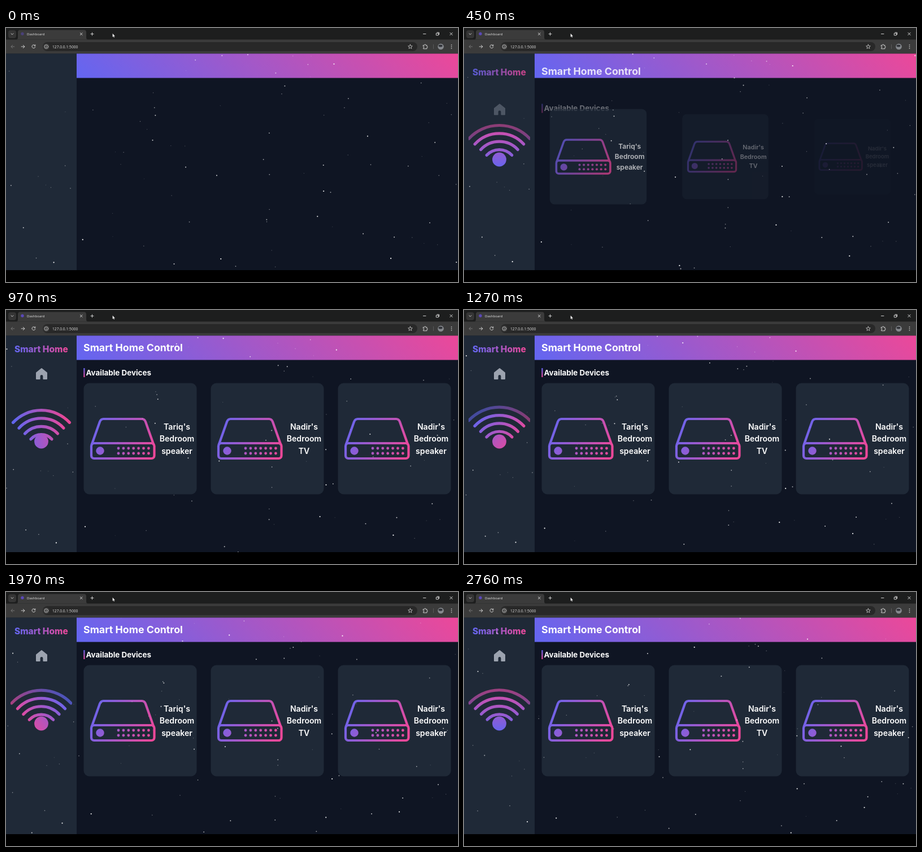
An HTML page for the animation above (2.79 s loop, 800 by 450 pixels).

```html
<!DOCTYPE html>
<html lang="en">
<head>
<meta charset="utf-8">
<title>Dashboard</title>
<style>
  html, body { margin: 0; width: 100%; height: 100%; overflow: hidden; background: #000; }
  svg { display: block; width: 100%; height: 100%; }
  text { font-family: Inter, sans-serif; font-weight: 700; fill: #fff; }
  .ui text { font-family: "Open Sans", sans-serif; font-weight: 400; fill: #e3e3e3; }
  .line { fill: none; stroke: #d0d0d0; stroke-linecap: round; stroke-linejoin: round; }
  .thin { stroke-width: .8; }
  .label { font-size: 14.1px; font-weight: 600; text-anchor: middle; }
  .device { fill: none; stroke: url(#device); stroke-width: 4.2; stroke-linejoin: round; }
  .dot { fill: url(#device); }
</style>
</head>
<body>
<svg viewBox="0 0 800 450">
  <defs>
    <linearGradient id="brandFill">
      <stop stop-color="#6366f1"/><stop offset="1" stop-color="#ec4899"/>
    </linearGradient>
    <linearGradient id="header" href="#brandFill" gradientUnits="userSpaceOnUse" x1="283" y1="246" x2="642" y2="-113"/>
    <linearGradient id="barFill" href="#brandFill" x2="0" y2="1"/>
    <linearGradient id="device" href="#brandFill" gradientUnits="userSpaceOnUse" x1="24" y1="22" x2="-88" y2="-28"
      gradientTransform="rotate(180 -32 -3)"/>
    <linearGradient id="signal" href="#brandFill" gradientUnits="userSpaceOnUse" x1="62.5" y1="250" x2="62.5" y2="162"/>
    <clipPath id="page"><rect y="45" width="800" height="384"/></clipPath>
    <clipPath id="signalBox"><rect x="8" y="164" width="109" height="85"/></clipPath>
  </defs>

  <g class="ui">
    <rect width="800" height="46" fill="#1d1e1e"/>
    <rect y="20.5" width="800" height="25" fill="#3b3b3b"/>
    <path d="M18 20.5q3 0 3-4v-9q0-4 4-4h113q4 0 4 4v9q0 4 3 4z" fill="#3b3b3b"/>
    <rect x="4" y="4" width="14" height="14" rx="4" fill="#353535"/>
    <path class="line" d="M9 9.7l2 2 2-2"/>
    <circle id="favicon" cx="29" cy="10.3" r="2.7" fill="#5a48b8"/>
    <text x="37" y="12.8" font-size="6.1">Dashboard</text>
    <path class="line" d="M131.300 8.700l3.800 3.800m0-3.800l-3.800 3.800M150 10.600h5m-2.500-2.500v5"/>
    <path class="line" d="M738.500 10.500h4.500M761.700 9.300h3.600v3.600h-3.600zM763 8h3.500v3.600M785.800 8.200l4.400 4.400m0-4.400l-4.400 4.400"/>
    <path class="line" style="stroke:#757575" d="M14.700 33H9m2.500-2.600L9 33l2.500 2.600"/>
    <path class="line" d="M27.200 33h5.700m-2.500-2.600l2.500 2.600-2.500 2.600M51.500 31a3 3 0 1 0 .4 2.600M51.800 29.700v2h-2"/>
    <rect x="65" y="25" width="663" height="16" rx="8" fill="#282828"/>
    <circle cx="71.3" cy="33" r="5.6" fill="#3b3b3b"/>
    <circle class="line thin" cx="71.3" cy="33" r="3.3"/>
    <path class="line thin" d="M71.300 33v1.600m0-3.300v.1"/>
    <text x="82" y="35.5" font-size="6.7">127.0.0.1:5000</text>
    <path id="bookmark" class="line thin"/>
    <path class="line" d="M738.700 30.500h2q0-1.500 1.100-1.500t1.100 1.500h2v2.100q1.300 0 1.300 1.100t-1.300 1.100v2h-6.200v-2q1.300 0 1.300-1.100t-1.300-1.100z"/>
    <path d="M756.500 29v8" stroke="#5a5a5a"/>
    <circle cx="769.5" cy="33" r="5.3" fill="#85888d"/>
    <ellipse cx="769" cy="31.500" rx="3.500" ry="2" fill="#303238"/>
    <path d="M788.500 30v6.500" stroke="#d0d0d0" stroke-width="1.700" stroke-linecap="round" stroke-dasharray="0 3"/>
  </g>

  <g clip-path="url(#page)">
    <rect x="125" y="45.400" width="675" height="384" fill="#0f1523"/>
    <rect x="125" y="45.400" width="675" height="43.100" fill="url(#header)"/>
    <rect y="45.400" width="125" height="384" fill="#1f2937"/>
    <text id="brand" x="15" y="75" font-size="15.500" style="font-weight:800;fill:url(#brandFill)">Smart Home</text>
    <text id="title" x="137" y="73.400" font-size="17.800">Smart Home Control</text>
    <path id="home" d="M63 104l9 7.200v10.800h-5.600v-5q0-3-3.400-3t-3.400 3v5H54v-10.800z" fill="#9ca3af" stroke="#9ca3af" stroke-width="2" stroke-linejoin="round"/>
    <g id="heading">
      <rect x="137.300" y="103" width="2.200" height="16" fill="url(#barFill)"/>
      <text x="141.500" y="115.700" font-size="13.400">Available Devices</text>
    </g>
    <g id="wifi" clip-path="url(#signalBox)">
      <g id="arcs" fill="none" stroke="url(#signal)" stroke-width="5.200" stroke-linecap="round"></g>
      <circle cx="62.500" cy="233" r="12.400" fill="url(#signal)"/>
    </g>
    <g id="cards"></g>
    <g id="stars" fill="#fff"></g>
  </g>
  <path d="M188.500 9.500v6.700l1.500-1.300 1 2.200 1.200-.5-1-2.200h2z" fill="#fff" stroke="#222" stroke-width=".4"/>
</svg>

<script>
const LOOP = 2790, STEP = 30;
const PAGE = { top: 45, width: 800, height: 384 };
const NS = 'http://www.w3.org/2000/svg';
const byId = id => document.getElementById(id);
const clamp = v => Math.max(0, Math.min(1, v));
const smooth = p => p * p * (3 - 2 * p);
const ease = (t, start, span) => smooth(clamp((t - start) / span));

function add(parent, tag, attrs, text = '') {
  const el = document.createElementNS(NS, tag);
  for (const key in attrs) el.setAttribute(key, attrs[key]);
  el.textContent = text;
  return parent.appendChild(el);
}

const corners = Array.from({ length: 10 }, (_, i) => {
  const r = i % 2 ? 1.8 : 4, a = i * Math.PI / 5;
  return `${715.5 + r * Math.sin(a)} ${33.2 - r * Math.cos(a)}`;
});
byId('bookmark').setAttribute('d', `M${corners.join('L')}z`);

// Device cards are drawn around their own centre.
function makeCard([owner, kind], i) {
  const g = add(byId('cards'), 'g', {});
  add(g, 'rect', { x: -100, y: -98.5, width: 200, height: 197, rx: 10, fill: '#1f2937' });
  add(g, 'path', { class: 'device', d: 'M-86 11L-71.5-30Q-69.500-35-65-35H3Q7.500-35 9.500-30L24 11' });
  add(g, 'rect', { class: 'device', x: -86.5, y: 8, width: 111.5, height: 27, rx: 5 });
  add(g, 'circle', { class: 'dot', cx: -71, cy: 21.5, r: 7.2 });
  for (let n = 0; n < 14; n++)
    add(g, 'circle', { class: 'dot', cx: -38.5 + (n % 7) * 8.9, cy: n < 7 ? 17 : 26, r: 2.4 });
  [owner, 'Bedroom', kind].forEach((word, row) =>
    add(g, 'text', { class: 'label', x: 65, y: -16.5 + row * 21.6 }, word));
  return { g, x: 237.5 + i * 225, start: 15 + i * 115 };
}
const cards = [["Tariq's", 'speaker'], ["Nadir's", 'TV'], ["Nadir's", 'speaker']].map(makeCard);

const arcs = Array.from({ length: 8 }, () => add(byId('arcs'), 'path', {}));

let seed = 17;
const random = () => (seed = seed * 16807 % 2147483647) / 2147483647;
const between = (low, high) => low + random() * (high - low);

const stars = Array.from({ length: 85 }, () => {
  const light = random();
  return {
    x: between(0, PAGE.width),
    y: between(0, PAGE.height),
    speed: between(-15, 43),
    el: add(byId('stars'), 'circle', { r: .6 + .5 * light, opacity: .15 + .8 * light })
  };
});

function rise(id, amount) {
  byId(id).setAttribute('transform', `translate(0 ${50 * (1 - amount)})`);
  byId(id).setAttribute('opacity', amount);
}

function drawSignal(t) {
  const halfAngle = 47 * Math.PI / 180;
  const front = 172.5 - .0181 * (t - 450);
  arcs.forEach((arc, k) => {
    const top = front + 14.35 * k;
    const r = Math.max(0, 246 - top);
    const dx = r * Math.sin(halfAngle), y = 246 - r * Math.cos(halfAngle);
    arc.setAttribute('d', `M${62.5 - dx} ${y}A${r} ${r} 0 0 1 ${62.5 + dx} ${y}`);
    arc.setAttribute('opacity', Math.min(clamp((224 - top) / 3), clamp((top - 165) / 13)));
  });
  byId('signal').setAttribute('gradientTransform', `rotate(${360 * (t - 450) / 2310} 62.5 206)`);
}

function draw(t) {
  const early = ease(t, 0, 620), late = ease(t, 160, 700), glow = ease(t, 0, 420);
  rise('brand', early);
  rise('title', early);
  rise('home', late);
  rise('heading', late);
  byId('wifi').setAttribute('opacity', glow);
  byId('favicon').setAttribute('opacity', .5 + .5 * glow);
  drawSignal(t);

  for (const { g, x, start } of cards) {
    const p = ease(t, start, 730);
    g.setAttribute('transform', `translate(${x} 228) scale(${.6 + .4 * p})`);
    g.setAttribute('opacity', smooth(p));
  }

  const drift = 28 * (t / LOOP) ** 1.75;
  for (const { x, y, speed, el } of stars) {
    el.setAttribute('cx', (x + drift) % PAGE.width);
    el.setAttribute('cy', PAGE.top + (y + speed * t / 1000 + PAGE.height) % PAGE.height);
  }
}

const origin = performance.now();
function tick() {
  const t = (performance.now() - origin) % LOOP;
  draw(Math.floor(t / STEP) * STEP);
  requestAnimationFrame(tick);
}
tick();
</script>
</body>
</html>
```
